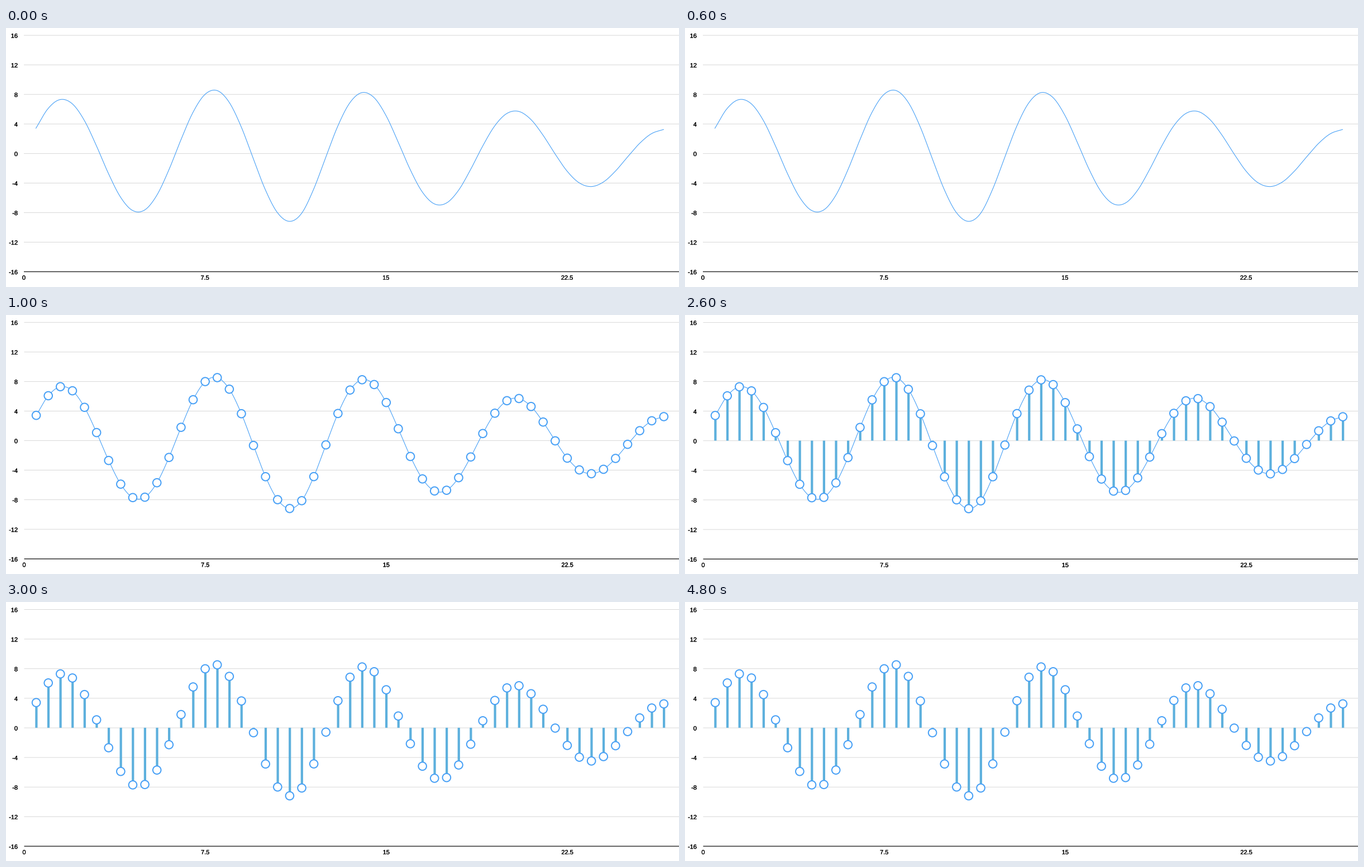
These frames come from a looping animation (1205x465 px, 6 s). A matplotlib script:

```python
import matplotlib.pyplot as plt
import numpy as np
from matplotlib.animation import FuncAnimation
from matplotlib.patches import Circle
from matplotlib.patheffects import withStroke

WIDTH, HEIGHT, DPI = 1205, 465, 100
PX = 72 / DPI
BLUE, BAR, GRID, AXIS = "#47a0f6", "#5db0dd", "#cfcfcf", "#303030"
X_SCALE, STEP = 43.22, 0.5

plt.rcParams["font.family"] = "Liberation Sans"
fig = plt.figure(figsize=(WIDTH / DPI, HEIGHT / DPI), dpi=DPI, facecolor="white")
ax = fig.add_axes([0, 0, 1, 1])


def wave(x):
    """Sine whose amplitude rises until 11.5 and then falls."""
    return np.minimum(7 + 0.2 * x, 13.9 - 0.4 * x) * np.sin(x)


def smooth(x, y, parts=12):
    """Catmull-Rom curve through evenly spaced points."""
    slope = np.gradient(y)
    t = np.linspace(0, 1, parts + 1)[:, None]
    curve = ((2 * t**3 - 3 * t**2 + 1) * y[:-1] + (t**3 - 2 * t**2 + t) * slope[:-1]
             + (3 * t**2 - 2 * t**3) * y[1:] + (t**3 - t**2) * slope[1:])
    return (x[:-1] + t * np.diff(x)).T.ravel(), curve.T.ravel()


def label(x, y, value, align):
    ax.text(x, y, f"{value:g}", ha=align, va="baseline", fontsize=11 * PX,
            color="black",
            path_effects=[withStroke(linewidth=0.2 * PX, foreground="black")])


def rule(left, y, color, width):
    ax.plot([left, WIDTH], [y, y], color=color, lw=width * PX,
            solid_capstyle="butt", snap=False)


def draw(frame):
    state = min(frame, 3)
    # The chart settles slightly right and down as it changes style
    left = 32 + 0.5 * min(state, 1)
    rows = np.linspace(13.1 + 0.13 * state, 437.5 + 0.33 * state, 9)
    zero = rows[4] - 0.2
    unit = (rows[1] - rows[0]) / 4

    ax.clear()
    ax.axis("off")
    ax.set(xlim=(0, WIDTH), ylim=(HEIGHT, 0))

    for value, y in zip(range(16, -17, -4), rows):
        label(21, y + 4.6, value, "right")
        if value > -16:
            rule(left, y, GRID, 0.8)
    for value in np.arange(0, 27, 7.5):
        label(left + X_SCALE * value, rows[-1] + 14.4, value, "center")

    samples = np.arange(STEP, 27, STEP)
    xs, ys = left + X_SCALE * samples, zero - unit * wave(samples)
    if state >= 2:
        ax.vlines(xs + 0.3, zero, ys, color=BAR, lw=4.2 * PX, snap=False, zorder=3)
    if state <= 2:
        ax.plot(*smooth(xs, ys), color=BLUE, lw=1.1 * PX, snap=False, zorder=4)
    if state >= 1:
        for center in zip(xs, ys):
            ax.add_patch(Circle(center, 7.3, facecolor="white", edgecolor=BLUE,
                                lw=2 * PX, zorder=5))
    rule(left, rows[-1], AXIS, 1.5)
    return []


anim = FuncAnimation(fig, draw, frames=6, interval=1000, init_func=lambda: [],
                     repeat=True, repeat_delay=0)
plt.show()
```
